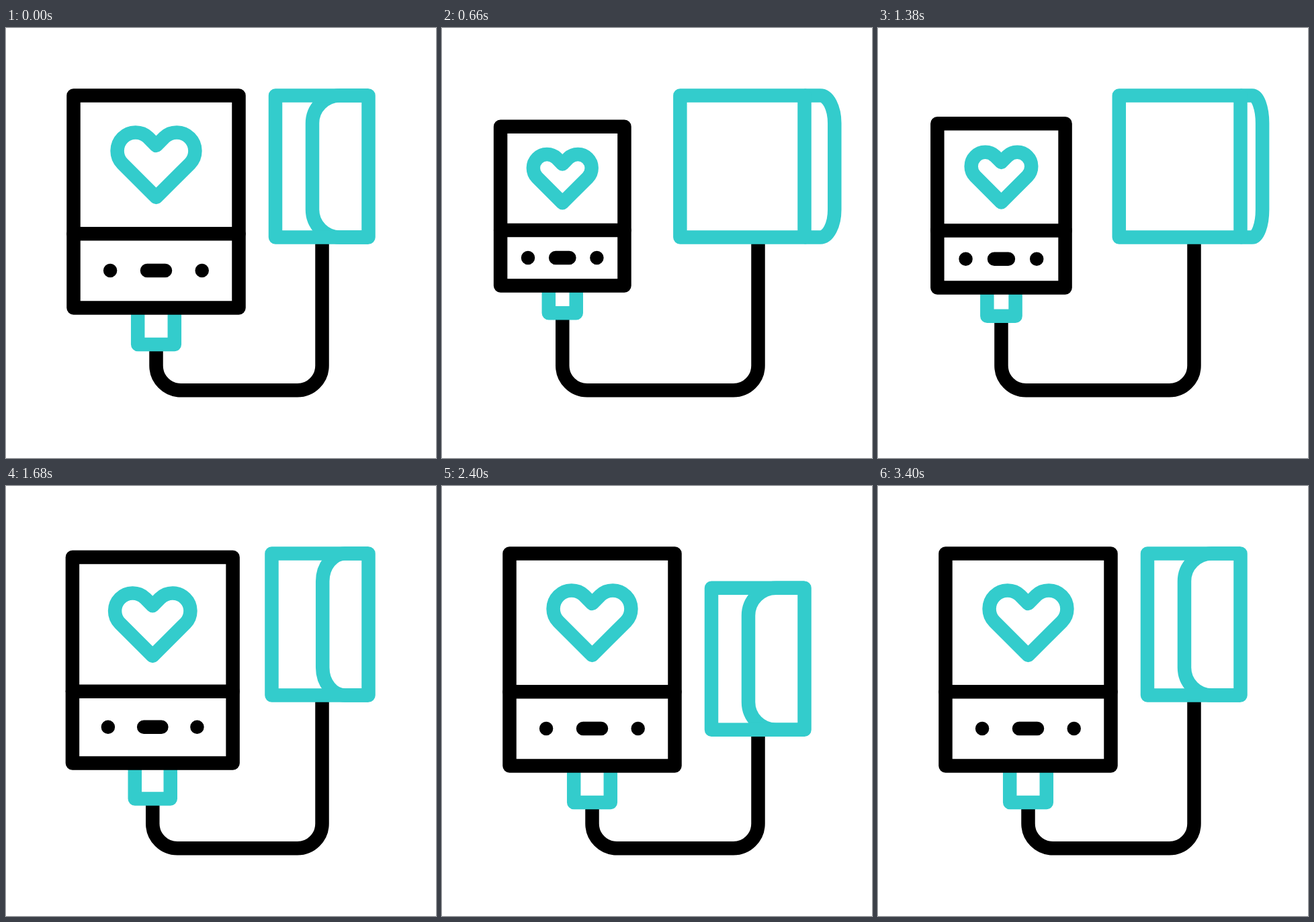
Recreate the animation shown at these times as an HTML page. Size 640 px wide and 640 px high, loop 3.6 s.

```html
<!DOCTYPE html>
<html lang="en">
<head>
<meta charset="utf-8">
<title>Blood pressure monitor</title>
<style>
  html, body { margin: 0; width: 100%; height: 100%; overflow: hidden; background: #fff; }
  svg { display: block; width: 100%; height: 100%; }
  path { fill: none; stroke: #000; stroke-width: 20.5; stroke-linejoin: round; vector-effect: non-scaling-stroke; }
  .teal { stroke: #33cccc; }
  .round { stroke-linecap: round; }
</style>
</head>
<body>
<svg viewBox="0 0 640 640">
  <path id="cable"/>
  <g id="device">
    <path class="teal" d="M196.2 417V471H250.8V417"/>
    <path class="teal" id="heart" d="M223.5 252L173.2 201.8A27.3 27.3 0 0 1 211.8 163.2L223.5 175L235.2 163.2A27.3 27.3 0 0 1 273.8 201.8Z"/>
    <path d="M100.5 100.5H346.5V416.5H100.5Z"/>
    <path class="round" d="M100.5 306.3H346.5M210 361H237M155.1 361h.01M291.7 361h.01"/>
  </g>
  <g id="cuff">
    <path class="teal" id="flap"/>
    <path class="teal" id="panel"/>
  </g>
</svg>
<script>
  const LOOP = 3600;
  const [cable, device, heart, cuff, flap, panel] =
    ['cable', 'device', 'heart', 'cuff', 'flap', 'panel'].map(id => document.getElementById(id));

  // [time in ms, value] keys, eased in and out between neighbours
  const UNROLL = [[200, 0], [800, 1], [1200, 1], [1800, 0]];
  const DROP = [[1800, 0], [2200, 51.2], [3000, 51.2], [3400, 0]];
  const BEAT = [[1800, 1], [2200, 1.355], [2400, 1], [2600, 1.355], [2800, 1], [3000, 1.355], [3400, 1]];

  function track(keys, t) {
    if (t <= keys[0][0]) return keys[0][1];
    for (let i = 1; i < keys.length; i++) {
      const [t0, a] = keys[i - 1], [t1, b] = keys[i];
      if (t < t1) {
        const u = (t - t0) / (t1 - t0);
        return a + (b - a) * u * u * (3 - 2 * u);
      }
    }
    return keys[keys.length - 1][1];
  }

  const scaleAt = (x, y, s, cx, cy) => `translate(${x} ${y}) scale(${s}) translate(${-cx} ${-cy})`;

  function draw(t) {
    const p = track(UNROLL, t), drop = track(DROP, t);

    const x = 223.5 - 51.2 * p, y = 258.5 + 7.6 * p, s = 1 - 0.29 * p;
    device.setAttribute('transform', scaleAt(x, y, s, 223.5, 258.5));
    heart.setAttribute('transform', scaleAt(223.5, 203.6, track(BEAT, t), 223.5, 203.6));

    const r = 36.8;
    cable.setAttribute('d', `M${x} ${y + 212.5 * s}V${539.3 - r}a${r} ${r} 0 0 0 ${r} ${r}` +
      `H${470.5 - r}a${r} ${r} 0 0 0 ${r} ${-r}V${311.5 + drop}`);

    const bend = 497 + 76.6 * p, side = 456 + 148.5 * p;
    const c1 = bend + (side - bend) * 0.552;
    cuff.setAttribute('transform', `translate(0 ${drop})`);
    flap.setAttribute('d', `M539.5 100.5H${bend}C${c1} 100.5 ${side} 119 ${side} 141.8` +
      `V270.2C${side} 293 ${c1} 311.5 ${bend} 311.5H539.5`);
    panel.setAttribute('d', `M${401 - 54 * p} 100.5H539.5V311.5H${401 - 54 * p}Z`);
  }

  const start = performance.now();
  function tick() {
    draw((performance.now() - start) % LOOP);
    requestAnimationFrame(tick);
  }
  tick();
</script>
</body>
</html>
```
